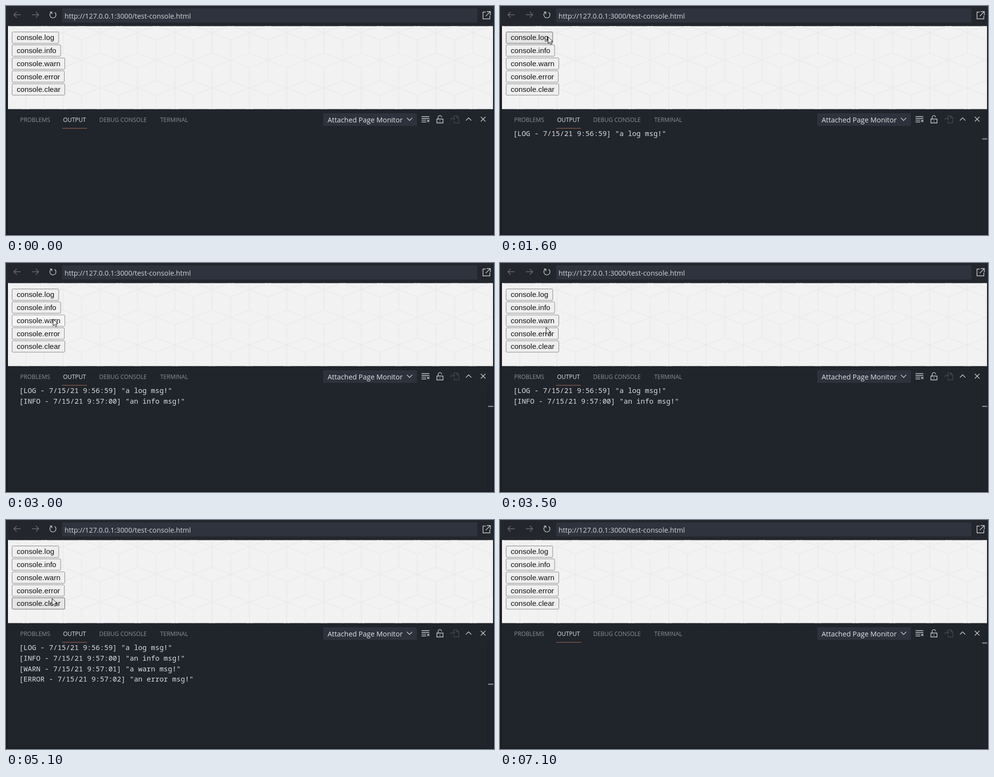
These frames come from a looping animation (1000x472 px, 7200 ms). An HTML page:

```html
<!DOCTYPE html>
<html lang="en">
<head>
<meta charset="utf-8">
<title>Console output</title>
<style>
html, body { margin: 0; width: 100%; height: 100%; overflow: hidden; background: #20242b; }
svg { display: block; width: 1000px; height: 472px; }
text { white-space: pre; }
.ui { font-family: "Open Sans", "Noto Sans", sans-serif; }
.tab { font-size: 11.9px; fill: #8b8f96; }
.tab.on { fill: #e6e8ea; }
.btn rect { fill: #efefef; stroke: #858585; }
.btn text { font: 15.2px "Liberation Sans", Arial, sans-serif; fill: #111; }
.line { font: 14.53px "Noto Sans Mono", "DejaVu Sans Mono", monospace; fill: #dcdfe3; }
.icon { fill: none; stroke: #c8cbd0; stroke-width: 1.4; }
.dim { stroke: #696d75; }
.off { stroke: #41464e; }

/* One loop is 7200 ms, so 100 ms is 1.389%. */
.line, #ruler, #marker, #cursor, .btn rect { animation: 7200ms step-end infinite; }
.line, #ruler { visibility: hidden; }
#log rect { animation-name: log; }
#info rect { animation-name: info; }
#warn rect { animation-name: warn; }
#error rect { animation-name: error; }
#clear rect { animation-name: clear; }
#l0 { animation-name: l0; }
#l1 { animation-name: l1; }
#l2 { animation-name: l2; }
#l3 { animation-name: l3; }
#ruler { animation-name: ruler; }
#marker { animation-name: marker; }
#cursor { animation-name: cursor; visibility: hidden; }

@keyframes log {
  13.88% { fill: #e5e5e5; stroke: #5c5c5c; }
  16.66% { fill: #f5f5f5; stroke: #8d8d8d; }
  22.22% { fill: #e5e5e5; stroke: #5c5c5c; }
  26.38% { fill: #efefef; stroke: #858585; }
}
@keyframes info {
  26.38% { fill: #e5e5e5; stroke: #5c5c5c; }
  31.94% { fill: #f5f5f5; stroke: #8d8d8d; }
  33.33% { fill: #e5e5e5; stroke: #5c5c5c; }
  36.11% { fill: #efefef; stroke: #858585; }
}
@keyframes warn {
  36.11% { fill: #e5e5e5; stroke: #5c5c5c; }
  41.66% { fill: #f5f5f5; stroke: #8d8d8d; }
  43.05% { fill: #e5e5e5; stroke: #5c5c5c; }
  48.61% { fill: #efefef; stroke: #858585; }
}
@keyframes error {
  51.38% { fill: #e5e5e5; stroke: #5c5c5c; }
  63.88% { fill: #f5f5f5; stroke: #8d8d8d; }
  65.27% { fill: #e5e5e5; stroke: #5c5c5c; }
  70.83% { fill: #efefef; stroke: #858585; }
}
@keyframes clear {
  70.83% { fill: #e5e5e5; stroke: #5c5c5c; }
  79.16% { fill: #f5f5f5; stroke: #8d8d8d; }
  80.55% { fill: #e2e2e2; stroke: #5c5c5c; }
  88.88% { fill: #efefef; stroke: #858585; }
}
@keyframes l0 { 22.22% { visibility: visible; } 80.55%, 100% { visibility: hidden; } }
@keyframes l1 { 33.33% { visibility: visible; } 80.55%, 100% { visibility: hidden; } }
@keyframes l2 { 51.38% { visibility: visible; } 80.55%, 100% { visibility: hidden; } }
@keyframes l3 { 65.27% { visibility: visible; } 80.55%, 100% { visibility: hidden; } }
@keyframes ruler { 0% { visibility: hidden; } 22.22%, 100% { visibility: visible; } }
@keyframes marker {
  0% { transform: translateY(0); }
  22.22% { transform: translateY(20.5px); }
  33.33% { transform: translateY(42px); }
  51.38% { transform: translateY(63.5px); }
  65.27% { transform: translateY(85px); }
  80.55%, 100% { transform: translateY(0); }
}
@keyframes cursor {
  0% { visibility: hidden; transform: translate(290px, 128px); }
  6.94% { visibility: visible; transform: translate(290px, 128px); animation-timing-function: steps(3); }
  11.11% { visibility: visible; transform: translate(114px, 61px); }
  12.5% { visibility: visible; transform: translate(111px, 61px); animation-timing-function: steps(2); }
  15.27% { visibility: visible; transform: translate(98px, 63px); }
  23.61% { visibility: visible; transform: translate(98px, 65px); animation-timing-function: steps(4); }
  29.16% { visibility: visible; transform: translate(97px, 89px); }
  34.72% { visibility: visible; transform: translate(97px, 92px); animation-timing-function: steps(2); }
  37.5% { visibility: visible; transform: translate(96px, 115px); }
  45.83% { visibility: visible; transform: translate(96px, 119px); animation-timing-function: steps(2); }
  48.61% { visibility: visible; transform: translate(94px, 132px); }
  51.38% { visibility: visible; transform: translate(93px, 136px); animation-timing-function: steps(3); }
  55.55% { visibility: visible; transform: translate(92px, 141px); }
  68.05% { visibility: visible; transform: translate(92px, 146px); animation-timing-function: steps(3); }
  72.22% { visibility: visible; transform: translate(95px, 169px); }
  88.88%, 100% { visibility: hidden; transform: translate(95px, 169px); }
}
</style>
</head>
<body>
<svg viewBox="0 0 1000 472">
  <defs>
    <pattern id="cubes" x="116.8" y="55" width="76.4" height="114" patternUnits="userSpaceOnUse">
      <path d="M0 0L38.2 15L76.4 0M0 0L38.2 -15L76.4 0M0 42L38.2 57L0 72M76.4 42L38.2 57L76.4 72M0 114L38.2 99L76.4 114M38.2 15V57M0 0V42M76.4 0V42M0 72V114M76.4 72V114M38.2 57V99"
        fill="none" stroke="#ebebeb" stroke-width="1.8"/>
    </pattern>
    <clipPath id="pick"><path d="M650 221h166v26h-166z"/></clipPath>
  </defs>

  <path d="M0 0H1000V472H0z" fill="#20242b"/>
  <path d="M0 0H1000V41H0z" fill="#23262c"/>
  <path d="M115 5H966V34H115z" fill="#2f333d"/>
  <path d="M0 41H4V472H0zM998 41H1000V472H998zM0 470H1000V472H0z" fill="#191c21"/>
  <path d="M4 41.5H998V212.5H4z" fill="#f2f2f2"/>
  <path d="M4 41.5H998V212.5H4z" fill="url(#cubes)"/>

  <path class="icon dim" d="M30 18H16M22 12L16 18L22 24M53 18H67M61 12L67 18L61 24"/>
  <path class="icon" d="M92.5 13.2A6.3 6.3 0 1 0 99.5 13M90 12.5H94V16.7"/>
  <path class="icon" d="M983 12.5H977.5V26.500H991.5V20M985 11.500H992.500V19M992 12L983 21"/>
  <text class="ui" x="120" y="25.500" font-size="14.27" fill="#d4d7dc">http://127.0.0.1:3000/test-console.html</text>

  <g class="btn" id="log"><rect x="12.5" y="53.5" width="95.500" height="23.5" rx="2"/><text x="22" y="70.3">console.log</text></g>
  <g class="btn" id="info"><rect x="12.5" y="80" width="99.5" height="23.5" rx="2"/><text x="22" y="97">console.info</text></g>
  <g class="btn" id="warn"><rect x="12.5" y="107" width="108" height="23.5" rx="2"/><text x="22" y="123.8">console.warn</text></g>
  <g class="btn" id="error"><rect x="12.5" y="133.5" width="107" height="23.5" rx="2"/><text x="22" y="150.5">console.error</text></g>
  <g class="btn" id="clear"><rect x="12.5" y="160.3" width="108" height="23.5" rx="2"/><text x="22" y="177.2">console.clear</text></g>

  <g class="ui">
    <text class="tab" x="29" y="239">PROBLEMS</text>
    <text class="tab on" x="117" y="239">OUTPUT</text>
    <text class="tab" x="191" y="239">DEBUG CONSOLE</text>
    <text class="tab" x="316" y="239">TERMINAL</text>
    <path d="M115 251.500H166V252.800H115z" fill="#91604a"/>
    <path d="M650 221H842V247H650z" fill="#2d323c"/>
    <text x="659" y="240" font-size="14.4" fill="#e3e5e8" clip-path="url(#pick)">Attached Page Monitor</text>
  </g>
  <g class="icon">
    <path d="M821.5 230.5L827 236L832.5 230.500"/>
    <path d="M851.500 228H867.500M851.500 231.700H867.500M851.500 235.400H861M851.500 239H861M863 234.500L867.500 239M867.500 234.500L863 239"/>
    <path d="M883 233H895.500V241H883zM885.500 233V229.500A3.600 3.600 0 0 1 892.700 229.500M889.300 236V238.300"/>
    <path class="off" d="M918 229V226.500H924L928 230.500V241H918V237M924 226.500V230.500H928M912 236V232H919M916.500 229L919.500 232L916.500 235"/>
    <path d="M942.500 236L948 230.500L953.500 236M973 228.500L982.500 238M982.500 228.500L973 238"/>
  </g>

  <text class="line" id="l0" x="27" y="268.3">[LOG - 7/15/21 9:56:59] "a log msg!"</text>
  <text class="line" id="l1" x="27" y="290">[INFO - 7/15/21 9:57:00] "an info msg!"</text>
  <text class="line" id="l2" x="27" y="311.7">[WARN - 7/15/21 9:57:01] "a warn msg!"</text>
  <text class="line" id="l3" x="27" y="333.4">[ERROR - 7/15/21 9:57:02] "an error msg!"</text>

  <g id="ruler">
    <path d="M987.500 253V470" stroke="#1a1d22"/>
    <path id="marker" d="M988 252.500H998.500V254.500H988z" fill="#9a9fa8"/>
  </g>

  <path id="cursor" d="M.5 .5V14.300L3.700 11.300L5.900 16.400L8.300 15.400L6.100 10.400H10.300z" fill="#fff" stroke="#111" stroke-linejoin="round"/>
</svg>
</body>
</html>
```
